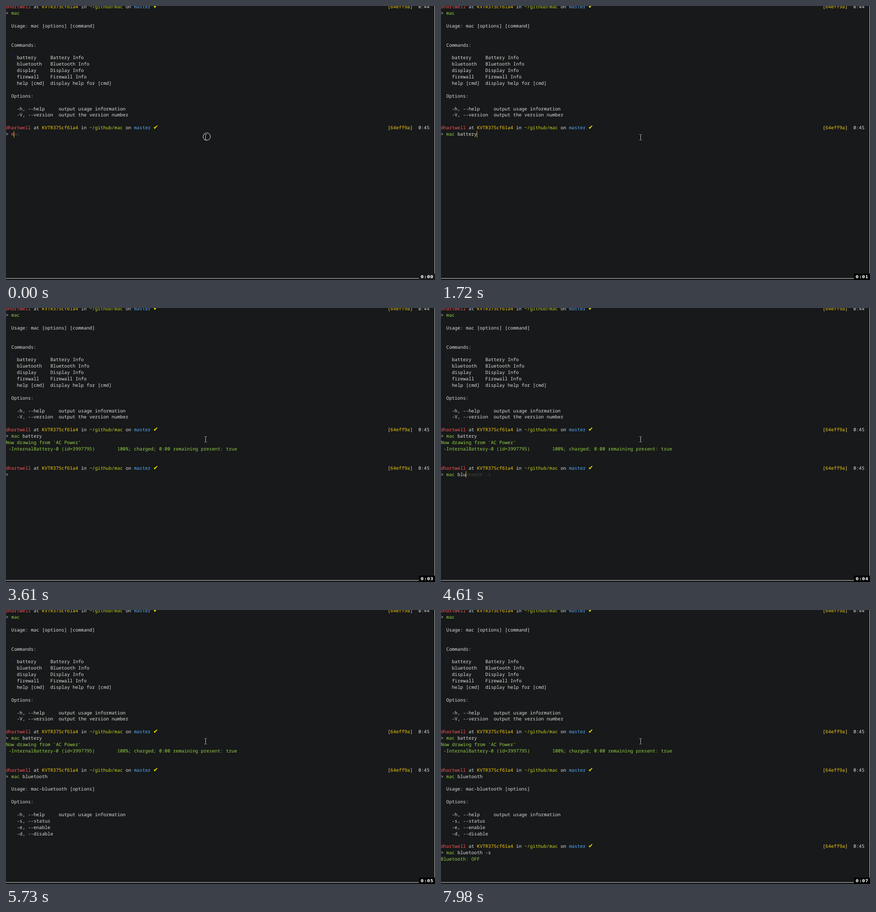
These frames come from a looping animation (936x598 px, 8 s). An HTML page with a canvas:

```html
<!DOCTYPE html>
<html lang="en">
<head>
<meta charset="utf-8">
<title>Terminal session</title>
<style>
  html, body { margin: 0; width: 100%; height: 100%; overflow: hidden; background: #17191a; }
  canvas { display: block; width: 936px; height: 598px; }
</style>
</head>
<body>
<canvas id="stage"></canvas>
<script>
const W = 936, H = 598, LOOP = 8000;
const CELL = 6.083, LEFT = -0.6, PITCH = 13.9, TOP = -5, BASE = 5.15;
const MONO = '10.14px "Noto Sans Mono", "DejaVu Sans Mono", monospace';
const C = {
  bg: '#17191a', text: '#dededb', red: '#f4545a', gold: '#f8cc0c', path: '#c3d021',
  blue: '#5aaaf8', tick: '#ebe000', green: '#95d045', ghost: '#454845', pale: '#e8d888', caret: '#f0b429'
};

const canvas = document.getElementById('stage');
const ctx = canvas.getContext('2d');
const ratio = window.devicePixelRatio || 1;
canvas.width = W * ratio;
canvas.height = H * ratio;
ctx.scale(ratio, ratio);
ctx.textRendering = 'geometricPrecision';

const colX = col => LEFT + col * CELL;
const baseline = row => Math.round(BASE + row * PITCH);

// Words sit on the character grid.
function put(row, col, str, color = C.text) {
  ctx.font = MONO;
  ctx.fillStyle = color;
  for (const m of str.matchAll(/\S+/g)) {
    ctx.fillText(m[0], colX(col + m.index), baseline(row));
  }
}

function prompt(row, clock) {
  put(row, 0, 'dhartwell', C.red);
  put(row, 10, 'at');
  put(row, 13, 'KVTR375cf61a4', C.gold);
  put(row, 27, 'in');
  put(row, 30, '~/github/mac', C.path);
  put(row, 43, 'on');
  put(row, 46, 'master', C.blue);
  ctx.font = '13px "DejaVu Sans", sans-serif';
  ctx.fillStyle = C.tick;
  ctx.fillText('✔', colX(53) - 0.5, baseline(row));
  put(row, 137, '[', C.pale);
  put(row, 138, '64eff9a', C.gold);
  put(row, 145, ']', C.pale);
  put(row, 148, clock);
  put(row + 1, 0, '>');
}

function command(row, typed, ghost = '', caret = false) {
  const word = typed.split(' ')[0];
  put(row, 2, word, word === 'mac' ? C.green : C.red);
  put(row, 2 + word.length, typed.slice(word.length));
  put(row, 2 + typed.length, ghost, C.ghost);
  if (caret) {
    ctx.fillStyle = C.caret;
    ctx.fillRect(Math.round(colX(2 + typed.length) - 0.2), Math.round(TOP + row * PITCH), 1, 14);
  }
}

function lines(row, list, color) {
  list.forEach((str, i) => put(row + i, 0, str, color));
}

const HELP = [
  '  Usage: mac [options] [command]', '', '',
  '  Commands:', '',
  '    battery     Battery Info',
  '    bluetooth   Bluetooth Info',
  '    display     Display Info',
  '    firewall    Firewall Info',
  '    help [cmd]  display help for [cmd]', '',
  '  Options:', '',
  '    -h, --help     output usage information',
  '    -V, --version  output the version number'
];
const BATTERY = [
  "Now drawing from 'AC Power'",
  ' -InternalBattery-0 (id=3997795)        100%; charged; 0:00 remaining present: true'
];
const BLUETOOTH = [
  '  Usage: mac-bluetooth [options]', '',
  '  Options:', '',
  '    -h, --help     output usage information',
  '    -s, --status', '    -e, --enable', '    -d, --disable'
];

// Input states: time, typed text, suggestion, caret.
const steps = [];
const key = (time, typed, full = '', caret = true) =>
  steps.push({ time, typed, ghost: full.slice(typed.length), caret });

function type(start, gap, full, from, to, hint = '') {
  for (let n = from; n <= to; n++) key(start + (n - from) * gap, full.slice(0, n), hint);
}

const BAT = 'mac battery', BLUE = 'mac bluetooth', STATUS = 'mac bluetooth -s';
type(0, 150, 'mac ', 1, 4, 'mac');
key(890, 'mac b');
type(1028, 138, BAT, 6, 11, BAT);
key(2470, BAT, '', false);
key(3170, '');
key(3610, '', '', false);
type(3750, 137, BAT, 1, 4, BAT);
key(4460, 'mac bl', STATUS);
type(4605, 139, BLUE, 7, 13, STATUS);
key(5590, BLUE, '', false);
key(5880, '');
key(6330, '', '', false);
key(6480, BLUE);
key(7080, BLUE, '', false);
type(7230, 150, STATUS, 14, 16, STATUS);
key(7830, STATUS, '', false);

const TICKS = [1025, 2020, 3020, 4020, 5020, 6330, 7080];

function pointer(t) {
  const x = 435.5, y = 286.5;
  const beam = () => {
    ctx.beginPath();
    ctx.moveTo(x, y - 5);
    ctx.lineTo(x, y + 5);
    for (const end of [y - 6, y + 6]) {
      ctx.moveTo(x - 2.5, end);
      ctx.lineTo(x - 0.5, end);
      ctx.moveTo(x + 0.5, end);
      ctx.lineTo(x + 2.5, end);
    }
    ctx.stroke();
  };
  ctx.strokeStyle = '#000';
  ctx.lineWidth = 2.4;
  beam();
  ctx.strokeStyle = '#e6e6e6';
  ctx.lineWidth = 1;
  beam();
  if (t < 300) {
    ctx.beginPath();
    ctx.arc(438, 285, 8, 0, Math.PI * 2);
    ctx.stroke();
  }
}

function frameAndTimer(t) {
  ctx.fillStyle = '#cfcfcf';
  ctx.fillRect(935, 0, 1, 584);
  ctx.fillRect(0, 594, 901, 1);
  const sec = TICKS.filter(x => x <= t).length;
  ctx.fillStyle = sec ? '#000' : C.bg;
  ctx.fillRect(901, 584, 35, 14);
  ctx.font = 'bold 9px "DejaVu Sans", sans-serif';
  ctx.textAlign = 'center';
  ctx.fillStyle = '#fff';
  [...('0:0' + sec)].forEach((ch, i) => {
    const x = 908 + i * 7;
    ctx.fillText(ch, x, 594);
    if (ch === '0') ctx.fillRect(x - 0.5, 590, 1, 1.5);
  });
  ctx.textAlign = 'left';
}

function smudge() {
  const g = ctx.createRadialGradient(14, 108, 0, 14, 108, 7);
  g.addColorStop(0, 'rgba(28,28,58,.7)');
  g.addColorStop(1, 'rgba(28,28,58,0)');
  ctx.fillStyle = g;
  ctx.fillRect(7, 101, 14, 14);
}

function draw(t) {
  ctx.fillStyle = C.bg;
  ctx.fillRect(0, 0, W, H);
  smudge();

  prompt(0, '0:44');
  command(1, 'mac');
  lines(3, HELP);
  prompt(19, '0:45');
  if (t >= 2770) lines(21, BATTERY, C.green);
  if (t >= 3170) {
    command(20, BAT);
    prompt(25, '0:45');
  }
  if (t >= 5730) lines(28, BLUETOOTH);
  if (t >= 5880) {
    command(26, BLUE);
    prompt(37, '0:45');
  }
  if (t >= 7980) put(39, 0, 'Bluetooth: OFF', C.green);

  const row = t < 3170 ? 20 : t < 5880 ? 26 : 38;
  const now = steps.filter(s => s.time <= t).pop();
  command(row, now.typed, now.ghost, now.caret);

  pointer(t);
  frameAndTimer(t);
}

function loop() {
  draw(performance.now() % LOOP);
  requestAnimationFrame(loop);
}
loop();
</script>
</body>
</html>
```
